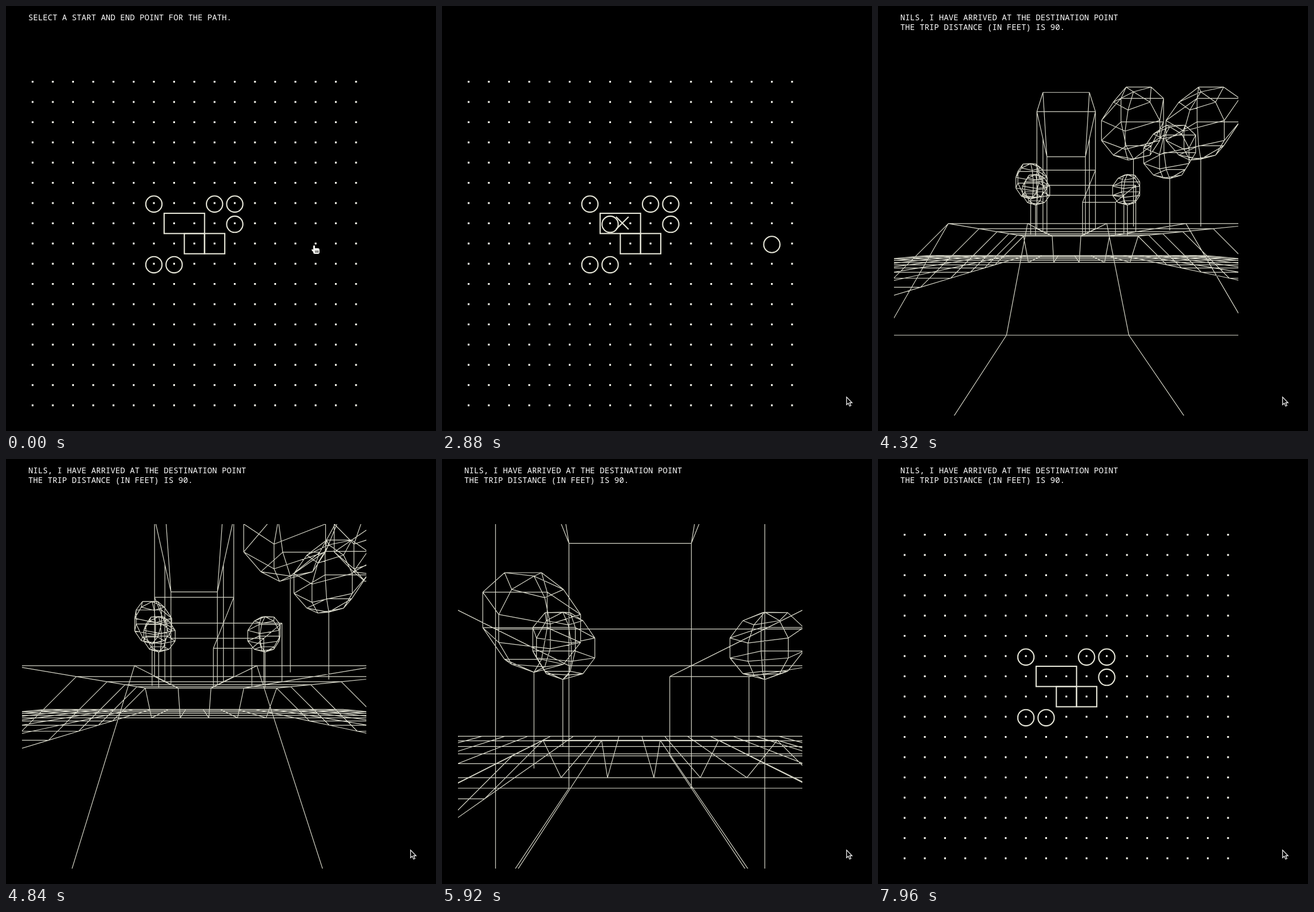
Write an HTML page with a canvas that moves like this. It is 753 by 744 pixels and loops after 8160 ms.

```html
<!DOCTYPE html>
<html lang="en">
<head>
<meta charset="utf-8">
<title>Path walk</title>
<style>
  html, body { margin: 0; width: 100%; height: 100%; overflow: hidden; background: #000; }
  canvas { display: block; }
</style>
</head>
<body>
<canvas id="stage" width="753" height="744"></canvas>
<script>
const ctx = document.getElementById('stage').getContext('2d');
const LOOP = 8160, INK = '#e6e6d8', WIRE = '#d8d8ca';
const START_CLICK = 360, END_CLICK = 900, ARRIVED = 3000, WALK = 3400, WALK_END = 7200;
const trees = [[6, 6], [9, 6], [10, 6], [10, 7], [6, 9], [7, 9]];
const rooms = [[7, 7], [8, 7], [8, 8], [9, 8]];
const start = [15, 8], end = [7, 7], LAST = 27;

const clamp = (v, lo, hi) => Math.max(lo, Math.min(hi, v));
const smooth = u => u * u * (3 - 2 * u);

// Route in thirds of a cell: west, one cell north, west
function place(n) {
  const west = Math.min(n, 21) + Math.max(n - 24, 0);
  const north = clamp(n - 21, 0, 3);
  return {
    x: start[0] - west / 3,
    y: start[1] - north / 3,
    north: n > 21 && n <= 24,
    spin: n > 21 ? 36 : 18
  };
}

/* ---------- plan view ---------- */
const gx = i => 46.6 + 35.4 * i, gy = j => 132.6 + 35.4 * j;

function ring([i, j]) {
  ctx.beginPath();
  ctx.arc(gx(i), gy(j) + 1.7, 14.2, 0, 7);
  ctx.stroke();
}

function block([i, j], w) {
  ctx.strokeRect(gx(i) - 17.5, gy(j) - 17.5, 35.4 * w, 35.4);
}

function drawPlan(t) {
  const first = t >= START_CLICK && t < WALK;
  const second = t >= END_CLICK && t < WALK;
  ctx.fillStyle = '#f0f0e8';
  for (let i = 0; i < 17; i++) for (let j = 0; j < 17; j++) {
    if (first && i === start[0] && j === start[1]) continue;
    ctx.fillRect(gx(i) - 1.6, gy(j) - 1.6, 3.2, 3.2);
  }
  ctx.strokeStyle = INK;
  ctx.lineWidth = 2.1;
  trees.forEach(ring);
  block(rooms[0], 2);
  block(rooms[2], 1);
  block(rooms[3], 1);
  if (first) ring(start);
  if (second) ring(end);
  if (t >= 1350 && t < WALK) {
    const p = place(clamp(Math.round((t - 1380) / 60), 0, LAST));
    const x = gx(p.x) - 2.3, y = gy(p.y) - 0.3, r = 11;
    ctx.beginPath();
    for (const d of [r, -r]) {
      ctx.moveTo(x - r, y - d);
      ctx.lineTo(x + r, y + d);
    }
    ctx.stroke();
  }
}

/* ---------- walk view ---------- */
const VIEW = { x: 28, y: 114, size: 603, cx: 329.5, cy: 415.5, focal: 393, near: 0.04 };
const GRID_SHIFT = 0.0125;

// A plateau one unit high with sloping sides
const ground = (x, y) => clamp(Math.min(x - 4.5, 11.5 - x, y - 4.5, 10.5 - y), 0, 1);

function drawWalk(n) {
  const cam = place(n), eye = 0.75 + ground(cam.x, cam.y);

  const toCam = ([x, y, z]) => cam.north
    ? [x - cam.x, z - eye, cam.y - y]
    : [cam.y - y, z - eye, cam.x - x];

  function cut(p, q) {
    if (p[2] >= VIEW.near) return p;
    const u = (VIEW.near - p[2]) / (q[2] - p[2]);
    return p.map((v, i) => v + (q[i] - v) * u);
  }

  function plot(a, b) {
    if (a[2] < VIEW.near && b[2] < VIEW.near) return;
    [cut(a, b), cut(b, a)].forEach((p, i) => {
      const s = VIEW.focal / p[2];
      ctx[i ? 'lineTo' : 'moveTo'](VIEW.cx + p[0] * s, VIEW.cy - p[1] * s);
    });
  }
  const line = (a, b) => plot(toCam(a), toCam(b));

  function terrain() {
    const pt = (i, j) => [i - 0.5, j - 0.5 - GRID_SHIFT, ground(i - 0.5, j - 0.5)];
    for (let i = 0; i <= 17; i++) for (let j = 0; j <= 17; j++) {
      if (i < 17) line(pt(i, j), pt(i + 1, j));
      if (j < 17) line(pt(i, j), pt(i, j + 1));
    }
  }

  function cube([i, j]) {
    const corner = (k, z) => {
      const a = Math.PI * (k / 2 + 0.25);
      return [i + Math.cos(a) * Math.SQRT1_2, j + Math.sin(a) * Math.SQRT1_2, z];
    };
    for (let k = 0; k < 4; k++) {
      line(corner(k, 1), corner(k + 1, 1));
      line(corner(k, 2), corner(k + 1, 2));
      line(corner(k, 1), corner(k, 2));
    }
  }

  // Upper floor with a gable over the two tower rooms
  function loft() {
    const ridge = 8.5, south = 8.5, north = 7.5;
    for (const y of [north, south]) {
      for (const d of [-1, 0, 1]) line([ridge + d, y, 2], [ridge + d, y, 3]);
      line([ridge - 1, y, 3], [ridge + 1, y, 3]);
      for (const d of [-1, 1]) line([ridge, y, 4], [ridge + d, y, 3]);
    }
    for (const d of [-1, 0, 1]) {
      const z = 4 - Math.abs(d);
      line([ridge + d, north, z], [ridge + d, south, z]);
    }
  }

  // Five-sided globe on a pole
  function tree([i, j]) {
    line([i, j, 1], [i, j, 2]);
    const mid = toCam([i, j, 2.5]), rad = Math.PI / 180;
    const pt = (lat, k) => {
      const a = (cam.spin + 72 * k) * rad, r = 0.5 * Math.cos(lat * rad);
      return [mid[0] + r * Math.cos(a), mid[1] + 0.5 * Math.sin(lat * rad), mid[2] + r * Math.sin(a)];
    };
    for (let k = 0; k < 5; k++)
      for (let lat = -90; lat < 90; lat += 36) {
        plot(pt(lat, k), pt(lat + 36, k));
        if (lat > -90) plot(pt(lat, k), pt(lat, k + 1));
      }
  }

  ctx.save();
  ctx.beginPath();
  ctx.rect(VIEW.x, VIEW.y, VIEW.size, VIEW.size);
  ctx.clip();
  ctx.strokeStyle = WIRE;
  ctx.lineWidth = 1.2;
  ctx.beginPath();
  terrain();
  rooms.forEach(cube);
  loft();
  trees.forEach(tree);
  ctx.stroke();
  ctx.restore();
}

// The walk gains speed as fewer lines stay in sight
function walkStep(t) {
  const u = (t - WALK) / 1000;
  return Math.min(LAST, Math.round(5 * u + 0.285 * u ** 3));
}

/* ---------- text and pointer ---------- */
function say(...lines) {
  ctx.font = '500 14.13px "Noto Sans Mono", "DejaVu Sans Mono", monospace';
  ctx.fillStyle = '#fff';
  lines.forEach((s, i) => ctx.fillText(s, 39, 25 + 17 * i));
}

// Pointer stops: arrival time and place
const stops = [
  { at: 0, x: 538, y: 419 },
  { at: 320, x: gx(start[0]), y: gy(start[1]) - 3 },
  { at: 860, x: gx(end[0]) - 2, y: gy(end[1]) - 2 },
  { at: 1600, x: 537, y: 463 },
  { at: 2600, x: 708, y: 684 }
];

function pointer(t) {
  const i = stops.findIndex(s => s.at > t);
  if (i < 0) return stops[stops.length - 1];
  const a = stops[i - 1], b = stops[i], trip = Math.min(600, b.at - a.at);
  const u = smooth(clamp(1 - (b.at - t) / trip, 0, 1));
  return { x: a.x + (b.x - a.x) * u, y: a.y + (b.y - a.y) * u };
}

function drawHand() {
  ctx.fillStyle = '#f4f4f0';
  ctx.beginPath();
  ctx.roundRect(0, 0, 3, 10, 1.5);
  ctx.roundRect(0, 5, 11, 10, 3);
  ctx.fill();
  ctx.beginPath();
  ctx.ellipse(0, 9.5, 3.5, 1.5, 0.8, 0, 7);
  ctx.fill();
  ctx.fillStyle = '#000';
  for (let k = 0; k < 3; k++) ctx.fillRect(3.6 + 2.2 * k, 9, 0.9, 4);
}

function drawArrow() {
  ctx.fillStyle = '#000';
  ctx.strokeStyle = '#eee';
  ctx.lineWidth = 1.3;
  ctx.translate(0.5, 0.5);
  ctx.fill(new Path2D('M0 0V13.5L3 10.8L5.3 16L7.6 15L5.4 10H9.6Z'));
  ctx.stroke(new Path2D('M0 0V13.5L3 10.8L5.3 16L7.6 15L5.4 10H9.6Z'));
}

function drawMouse(t) {
  const p = pointer(t);
  ctx.save();
  ctx.translate(p.x, p.y);
  if (p.x > VIEW.x + VIEW.size) drawArrow();
  else drawHand();
  ctx.restore();
}

function draw(t) {
  ctx.fillStyle = '#000';
  ctx.fillRect(0, 0, 753, 744);
  if (t >= WALK && t < WALK_END) drawWalk(walkStep(t));
  else drawPlan(t);
  if (t < END_CLICK + 60) say('SELECT A START AND END POINT FOR THE PATH.');
  else if (t >= ARRIVED) say('NILS, I HAVE ARRIVED AT THE DESTINATION POINT', 'THE TRIP DISTANCE (IN FEET) IS 90.');
  drawMouse(t);
}

const began = performance.now();
function tick() {
  draw((performance.now() - began) % LOOP);
  requestAnimationFrame(tick);
}
tick();
</script>
</body>
</html>
```
